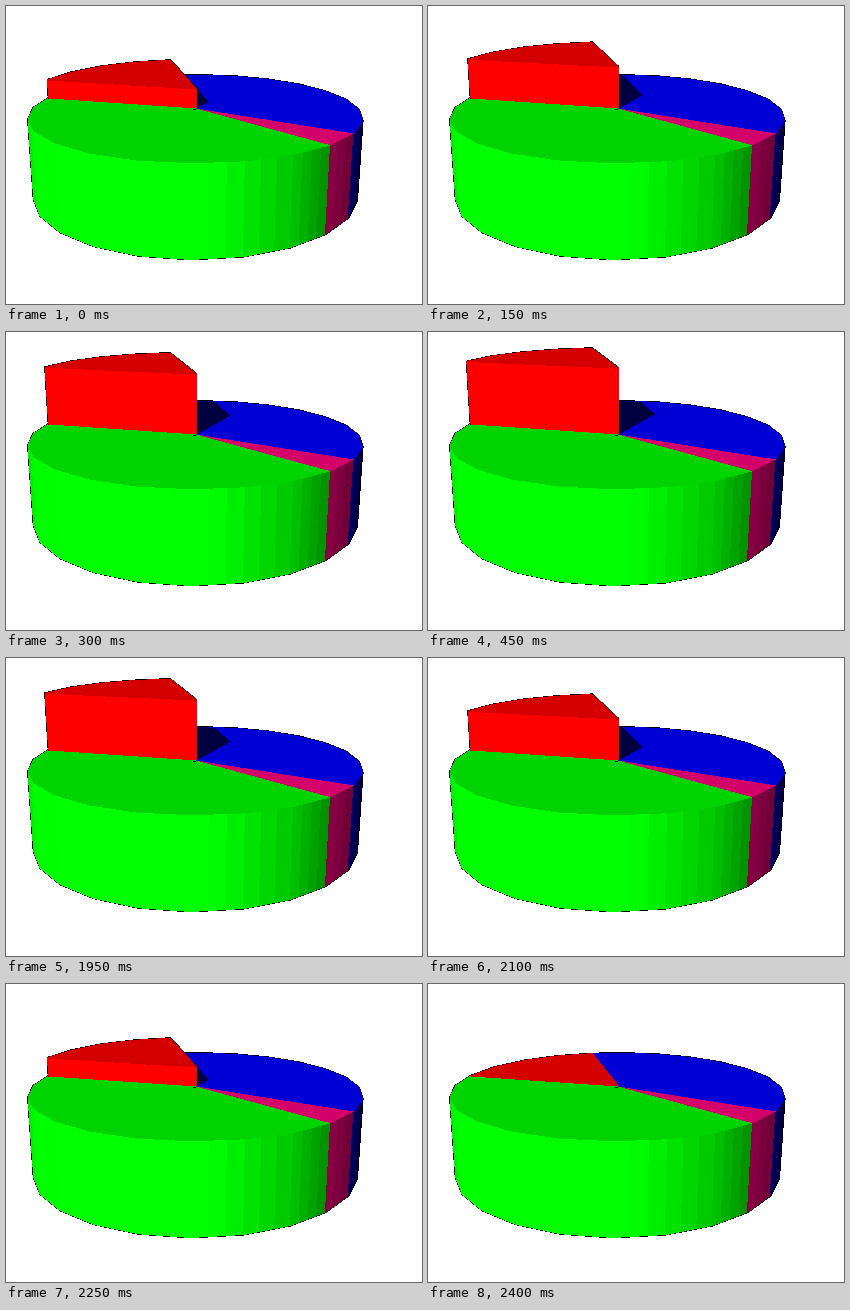
A matplotlib script that plays this animation: 416 by 298 pixels, repeating every 3900 ms.

```python
import numpy as np
import matplotlib.pyplot as plt
from matplotlib.animation import FuncAnimation
from matplotlib.patches import Polygon

W, H, DPI = 416, 298, 100
STEP = 150
FRAMES = 26

# Camera: pinhole looking down on a unit disc
CX, CY, FOCAL, DIST, YAW = 190.5, 102, 627, 3.87, 0.025
SIN, COS = 0.2538, 0.967
DEPTH = 0.494

TOP_LIGHT = 0.83
LIFTS = [0.120, 0.2565, 0.3726, 0.409]
SHADOW_DIR = np.array([0.615, -1.35])

GREEN, PINK, BLUE, RED = (0, 1, 0), (1, 0, 0.5), (0, 0, 1), (1, 0, 0)
# colour, start angle, end angle, facets
SLICES = [
    (GREEN, -195, -47.2, 10),
    (PINK, -47.2, -32, 1),
    (BLUE, -32, 101.5, 9),
    (RED, 101.5, 165, 4),
]
CENTER = np.zeros((1, 2))


def project(pts, height=0.0):
    x, z = np.asarray(pts, float).T
    d = DIST - z * COS - height * SIN + YAW * x
    sx = CX + FOCAL * x / d
    sy = CY + FOCAL * (z * SIN - height * COS) / d
    return np.column_stack([sx, sy])


def rim(start, end, n):
    a = np.radians(np.linspace(start, end, n + 1))
    return np.column_stack([np.cos(a), -np.sin(a)])


def shade(color, light):
    return tuple(c * min(light, 1) for c in color)


def wall_light(angle):
    return np.interp(angle, [-165, -150, -106, -91.6, -77, -62.3, -47.2, -32, -17],
                     [0.9, 1, 1, 1.05, 0.91, 0.78, 0.55, 0.42, 0.22])


def fill(pts, color):
    patch = Polygon(pts, closed=True, fc=color, ec="none", aa=False, zorder=1)
    return ax.add_patch(patch)


def outline(pts):
    # Aliased and drawn under the fills, so only a broken rim shows
    return ax.plot(*np.asarray(pts).T, color="black", lw=72 / DPI,
                   aa=False, zorder=1)[0]


def draw_wall(color, start, end, n):
    corners = rim(start, end, n)
    angles = np.linspace(start, end, n + 1)
    for i in range(n):
        if angles[i] > -20:
            break
        lights = wall_light(angles[i]), wall_light(angles[i + 1])
        strips = 1 + int(abs(lights[0] - lights[1]) / 0.065)
        for k in range(strips):
            t = np.array([[k], [k + 1]]) / strips
            edge = corners[i] + t * (corners[i + 1] - corners[i])
            light = lights[0] + (lights[1] - lights[0]) * (k + 0.5) / strips
            quad = np.vstack([project(edge), project(edge, -DEPTH)[::-1]])
            fill(quad, shade(color, light))


fig = plt.figure(figsize=(W / DPI, H / DPI), dpi=DPI, facecolor="white")
ax = fig.add_axes([0, 0, 1, 1])
ax.axis("off")

rims = [rim(*s[1:]) for s in SLICES]
green_rim, _, blue_rim, red_rim = rims
disc = np.vstack([r[:-1] for r in rims])

back = np.vstack([blue_rim[1:], red_rim[1:-1], green_rim[:3]])
front = np.vstack([green_rim[2:], blue_rim[:2]])
loop = np.vstack([project(back), project(front, -DEPTH)])
outline(np.vstack([loop, loop[:1]]))

for s in SLICES[:3]:
    draw_wall(*s)
for s, r in zip(SLICES, rims):
    fill(project(np.vstack([CENTER, r])), shade(s[0], TOP_LIGHT))

shadow = fill(np.zeros((4, 2)), (0, 0, 0.25))
shadow.set_clip_path(Polygon(project(disc), transform=ax.transData))

red_edge = outline(np.zeros((2, 2)))
red_front = fill(np.zeros((4, 2)), RED)
red_top = fill(np.zeros((6, 2)), shade(RED, TOP_LIGHT))
lifted_parts = [shadow, red_edge, red_front, red_top]
outline([(187, 102.5), (189, 102.5)])

ax.set_xlim(0, W)
ax.set_ylim(H, 0)

tip, corner = red_rim[:1], red_rim[-1:]


def lift_at(i):
    if i < 3:
        return LIFTS[i]
    if i < 13:
        return LIFTS[3]
    if i < 16:
        return LIFTS[15 - i]
    return 0


def update(i):
    lift = lift_at(i)
    for part in lifted_parts:
        part.set_visible(lift > 0)
    if lift:
        shift = lift * SHADOW_DIR
        shadow.set_xy(project(np.vstack([CENTER, CENTER + shift,
                                         tip + shift, tip])))
        cut = np.vstack([CENTER, corner])
        red_front.set_xy(np.vstack([project(cut, lift), project(cut)[::-1]]))
        top = project(np.vstack([CENTER, red_rim]), lift)
        red_top.set_xy(top)
        apex = top[0]
        path = [apex + (0, max(0, 68 - apex[1])), *top, project(corner)[0]]
        red_edge.set_data(*np.array(path).T)
    return lifted_parts


anim = FuncAnimation(fig, update, frames=FRAMES, interval=STEP,
                     repeat=True, repeat_delay=0, blit=False)
plt.show()
```
